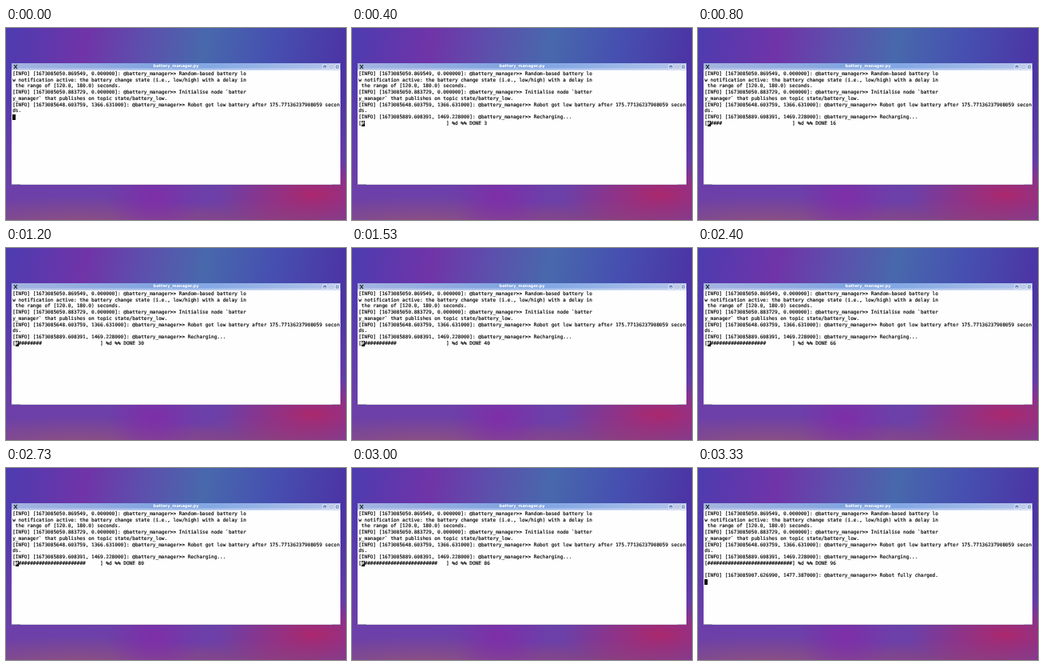
An HTML page that plays this animation: 426 px wide and 240 px high, repeating every 3.39 s.

```html
<!DOCTYPE html>
<html lang="en">
<head>
<meta charset="utf-8">
<title>battery_manager.py</title>
<style>
  html, body { margin: 0; width: 100%; height: 100%; overflow: hidden; }
  body {
    position: relative;
    background:
      radial-gradient(ellipse 60px 50px at 185px 212px, #8428a8c0, transparent),
      radial-gradient(ellipse 120px 45px at 385px 208px, #b42464e0, transparent),
      radial-gradient(ellipse 220px 36px at 90px 246px, #945478e0, transparent),
      radial-gradient(ellipse 180px 34px at 330px 246px, #944470c0, transparent),
      linear-gradient(transparent 30%, #6c40a8 85%),
      linear-gradient(100deg, #4c3cb0, #7034a8 22%, #5c50ac 38%, #4868ac 54%, #4650b0 72%, #4c34a4 92%);
  }
  .window {
    position: absolute; left: 7px; top: 44px; width: 412px; height: 152px;
    background: #fefefe;
  }
  .bar {
    position: absolute; inset: 0 0 auto; height: 8.5px;
    background:
      linear-gradient(#fff0 60%, #fff8),
      linear-gradient(90deg, #a4b4e0, #80a4e0 45%, #84a8e4 60%, #b4c4ea);
    color: #fff; text-align: center;
    font: bold 5.05px/9.6px "DejaVu Sans", sans-serif;
    text-rendering: geometricPrecision;
  }
  .bar svg { position: absolute; inset: 0; }
  .foot {
    position: absolute; inset: auto 0 0; height: 1.5px;
    background: linear-gradient(90deg, #a4acb8 11px, #dcdce0 11px 401px, #b8bcc8 401px);
  }
  pre {
    position: absolute; left: 1.2px; top: 9.9px; margin: 0; color: #000;
    font: 6.08px/7.75px "DejaVu Sans Mono", monospace;
    text-rendering: geometricPrecision;
    -webkit-text-stroke: .15px;
  }
  .cursor { background: #000; color: #fff; }
</style>
</head>
<body>
<div class="window">
  <div class="bar">battery_manager.py
    <svg width="412" height="9" fill="none" stroke="#fff" stroke-width=".8">
      <path d="M3 2l4 5M7 2l-4 5" stroke="#222" stroke-width="1.2"/>
      <path d="M390 2h5v5h-5zM398 2h5v5h-5zM405.5 2h5v5h-5z" fill="#7088c0"/>
      <path d="M391.5 5.5h2M399.5 3.5h2v2h-2zM407 3.5l2 2m0-2l-2 2"/>
    </svg>
  </div>
  <pre id="term"></pre>
  <div class="foot"></div>
</div>
<script>
  const LOOP = 3390, START = 290, STEP = 101, STEPS = 30;
  const term = document.getElementById('term');
  const cursor = c => `<span class="cursor">${c}</span>`;
  const info = (stamp, text) => `[INFO] [${stamp}]: @battery_manager&gt;&gt; ${text}\n`;

  const intro =
    info('1673085050.869549, 0.000000', 'Random-based battery lo\nw notification active: the battery change state (i.e., low/high) with a delay in\n the range of [120.0, 180.0) seconds.') +
    info('1673085050.883729, 0.000000', 'Initialise node `batter\ny_manager` that publishes on topic state/battery_low.') +
    info('1673085648.603759, 1366.631000', 'Robot got low battery after 175.77136237908059 secon\nds.');
  const charging = info('1673085889.608391, 1469.228000', 'Recharging...');
  const charged = info('1673085907.626990, 1477.387000', 'Robot fully charged.');

  function progress(n, active) {
    const cells = '#'.repeat(n).padEnd(STEPS - 1);
    const body = active ? cursor(cells[0]) + cells.slice(1) : cells;
    return `[${body}] %d %% DONE ${Math.floor(n * 100 / STEPS)}`;
  }

  function screen(n) {
    if (n < 0) return intro + cursor(' ');
    if (n < STEPS) return intro + charging + progress(n, true);
    return intro + charging + progress(STEPS - 1, false) + '\n\n' + charged + cursor(' ');
  }

  let shown;
  function draw(now) {
    const n = Math.floor((now % LOOP - START) / STEP);
    if (n !== shown) term.innerHTML = screen(shown = n);
    requestAnimationFrame(draw);
  }
  draw(performance.now());
</script>
</body>
</html>
```
